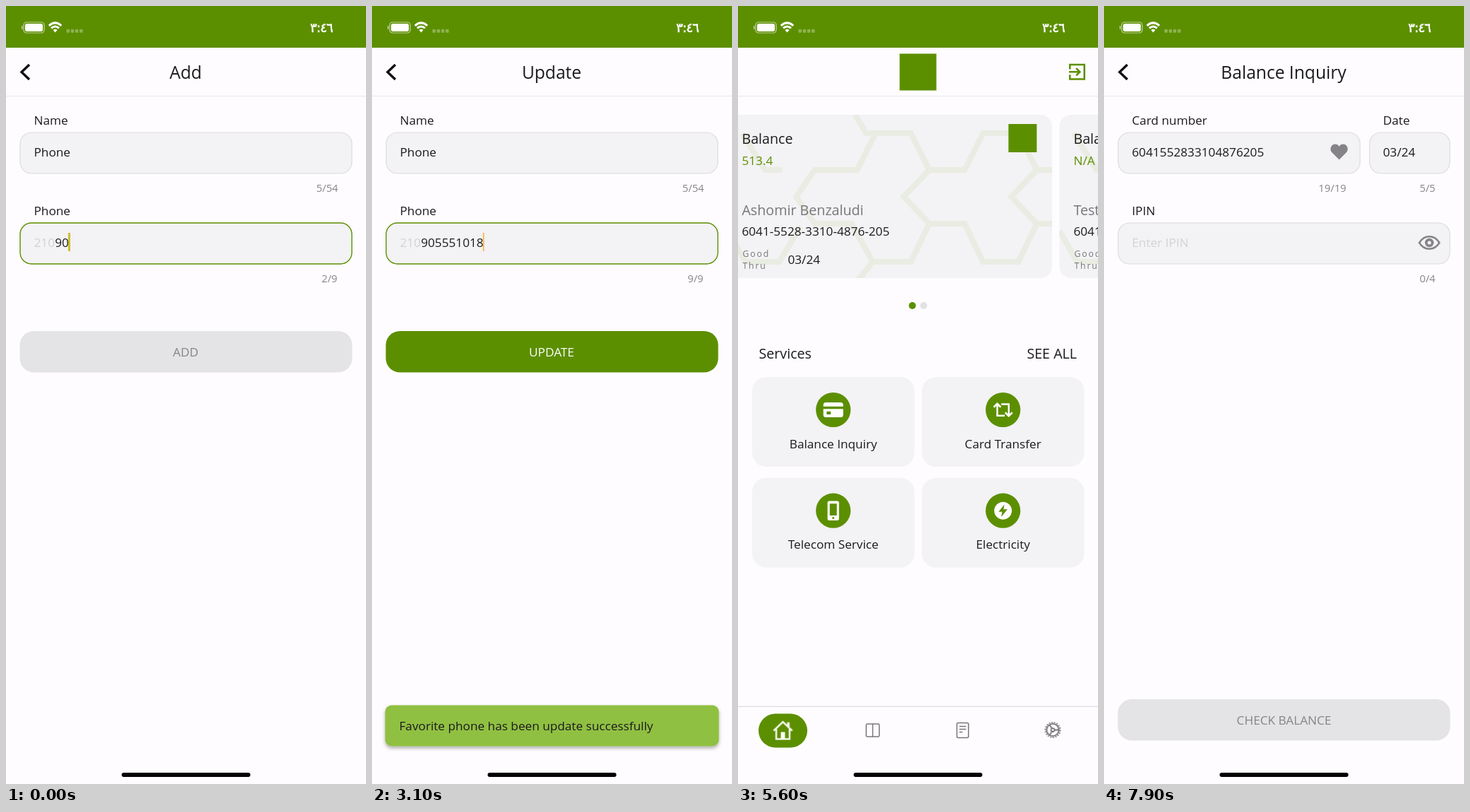
An HTML page for the animation above (8000 ms loop, 509x1101 px).

```html
<!DOCTYPE html>
<html lang="en">
<head>
<meta charset="utf-8">
<title>Favorite phone</title>
<style>
  html, body { margin: 0; width: 100%; height: 100%; overflow: hidden; background: #fefcfe; }
  svg { display: block; width: 509px; height: 1101px; }
  text { font: 17.2px "Open Sans", "Noto Sans", sans-serif; fill: #1b1a1d; }
  .t24 { font-size: 24.6px; }
  .t20 { font-size: 19.67px; }
  .t15 { font-size: 14.75px; fill: #858488; }
  .tiny { font-size: 12.3px; letter-spacing: 1.84px; fill: #77767a; }
  .mid { text-anchor: middle; }
  .end { text-anchor: end; }
  .grey { fill: #77767a; }
  .hint { fill: #d3d2d5; }
  .green { fill: #5c8f00; }
  .white { fill: #fff; }
  .clock { font: 18px "DejaVu Sans", sans-serif; letter-spacing: -.8px; fill: #fff; stroke: #fff; stroke-width: .6; }
  .ic { fill: currentColor; }
  .ln { fill: none; stroke: currentColor; stroke-width: 2; }
  .panel { fill: #f3f2f4; }
  .field { fill: #f3f2f4; stroke: #dddce0; stroke-width: 1.2; }
  .focus { stroke: #5c8f00; stroke-width: 1.4; }

  /* one loop is 8 s, so 1% is 80 ms */
  .anim { animation: 8s linear infinite; }
  #form { animation-name: form; }
  #tabs { animation-name: tabs; }
  #inquiry { animation-name: inquiry; }
  #toast { animation-name: toast; }
  #strip { animation-name: strip; }
  #pill { animation-name: pill; }
  #homeIcon { animation-name: homeIcon; }
  #gearIcon { animation-name: gearIcon; }
  #cards { animation-name: cards; }
  #dotA { animation-name: dotA; animation-timing-function: step-end; }
  #dotB { animation-name: dotB; animation-timing-function: step-end; }
  #send { animation-name: send; }
  #sendLabel { animation-name: sendLabel; }

  @keyframes form {
    0%, 40% { transform: translate(0); animation-timing-function: cubic-bezier(.2,.7,.35,1); }
    46.25% { transform: translate(502px); }
    47.5%, 100% { transform: translate(540px); }
  }
  @keyframes tabs {
    0%, 40% { transform: translate(-170px); animation-timing-function: cubic-bezier(.2,.7,.35,1); }
    46.25% { transform: translate(-2.3px); }
    47.5%, 92.75% { transform: translate(0); animation-timing-function: cubic-bezier(.2,.8,.3,1); }
    96.25%, 100% { transform: translate(-170px); }
  }
  @keyframes inquiry {
    0%, 92.75% { transform: translate(540px); animation-timing-function: cubic-bezier(.2,.8,.3,1); }
    96.25%, 100% { transform: translate(0); }
  }
  @keyframes toast {
    0%, 27.4% { transform: translate(0); opacity: 0; }
    31%, 40% { transform: translate(0); opacity: 1; animation-timing-function: cubic-bezier(.2,.7,.35,1); }
    46.25%, 50.5% { transform: translate(0, -67px); opacity: 1; }
    53.5%, 100% { transform: translate(0, -67px); opacity: 0; }
  }
  @keyframes strip {
    0%, 60.5% { transform: translate(-509px); animation-timing-function: cubic-bezier(.3,.3,.6,1); }
    62.5% { transform: translate(-85px); animation-timing-function: cubic-bezier(.1,.5,.3,1); }
    66.25%, 100% { transform: translate(0); }
  }
  @keyframes pill {
    0%, 60.5% { transform: translate(382px); animation-timing-function: cubic-bezier(.3,.3,.6,1); }
    62.5% { transform: translate(64px); animation-timing-function: cubic-bezier(.1,.5,.3,1); }
    66.25%, 100% { transform: translate(0); }
  }
  @keyframes homeIcon {
    0%, 60.5% { color: #77767a; transform: scale(1); }
    62.5% { color: #dddde0; transform: scale(1.15); }
    66.25%, 100% { color: #fff; transform: scale(1.18); }
  }
  @keyframes gearIcon {
    0%, 60.5% { color: #fff; transform: scale(1.18); }
    62.5%, 100% { color: #77767a; transform: scale(.96); }
  }
  @keyframes cards {
    0%, 69% { transform: translate(0); animation-timing-function: cubic-bezier(.4,.1,.25,1); }
    76.25%, 79.4% { transform: translate(-469px); animation-timing-function: cubic-bezier(.4,.1,.25,1); }
    88.5%, 100% { transform: translate(0); }
  }
  @keyframes dotA { 0% { fill: #5c8f00; } 72.4% { fill: #e2e1e4; } 83.6%, 100% { fill: #5c8f00; } }
  @keyframes dotB { 0% { fill: #e2e1e4; } 72.4% { fill: #5c8f00; } 83.6%, 100% { fill: #e2e1e4; } }
  @keyframes send {
    0%, 10.6% { fill: #e4e3e5; }
    13.6%, 16% { fill: #5c8f00; }
    18%, 27.4% { fill: #c5db9b; }
    28.75%, 100% { fill: #5c8f00; }
  }
  @keyframes sendLabel { 0%, 10.6% { fill: #858488; } 13.6%, 100% { fill: #fff; } }
</style>
</head>
<body>
<svg id="stage" viewBox="0 0 509 1101"></svg>
<script>
const GREEN = '#5c8f00';
const PHONE = '905551018';
const OWNER = 'Ashomir Benzaludi';
const CARD = '6041-5528-3310-4876-205';

const ICONS = {
  exit: '<path class="ln" d="M4 9V4H20V20H4V15M3 12H15M11 8l4 4-4 4"/>',
  card: '<path fill-rule="evenodd" d="M3 3H21Q24 3 24 6V8H0V6Q0 3 3 3ZM0 11H24V18Q24 21 21 21H3Q0 21 0 18ZM4 14V17.5H9V14Z"/>',
  people: '<circle cx="7.5" cy="8.5" r="3.2"/><circle cx="16" cy="8" r="3.6"/><path d="M0 19.5V18Q0 13.5 6 13.5Q9.5 13.5 10.5 15Q9 17 9 19.5ZM10.5 19.5Q10.5 13 16.5 13Q24 13 24 18V19.5Z"/>',
  call: '<path d="M5 3H8Q9 3 9.5 5L10.3 8L8 10.5Q10 14 13.5 16L16 13.6L20 15Q21 15.5 21 17V19Q21 21 19 21Q11 20.500 6.500 15.500Q3 11 3 5Q3 3 5 3Z"/>',
  bolt: '<path fill-rule="evenodd" d="M12 2a10 10 0 1 0 .01 0ZM13.500 5L7 13.200H11L10 19L17 10.500H12.600Z"/>',
  chat: '<path d="M10 4C4.500 4 1.500 7 1.500 10.500C1.500 13 3 14.500 3.500 15Q3 17 1.500 18.500Q5 18.500 7 17Q18.500 18 18.500 10.500C18.500 7 15.500 4 10 4ZM19.700 8Q22.500 9.500 22.500 13Q22.500 15.500 21 17Q21.500 19 22.500 20.300Q19.500 20.300 17.500 19Q13 19.700 10.500 18Q20.500 17.500 19.700 8Z"/>',
  swap: '<path class="ln" d="M1.500 9L5.500 5L9.500 9M5.500 5V18.500H14M22.500 15L18.500 19L14.500 15M18.500 19V5.500H10"/>',
  mobile: '<path fill-rule="evenodd" d="M7.500 1H16.500Q18.500 1 18.500 3V21Q18.500 23 16.500 23H7.500Q5.500 23 5.500 21V3Q5.500 1 7.500 1ZM8 4V17.500H16V4ZM12 19a1.200 1.200 0 1 0 .01 0Z"/>',
  home: '<path class="ln" stroke-width="1.6" d="M.8 12.500L12 2L23.200 12.500M4 10.500V22.500H20V10.500"/><path d="M9.500 14H14.500V23H9.500ZM17 2.500H20V8L17 5.500Z"/>',
  book: '<rect class="ln thin" x="2.800" y="3" width="18.400" height="18" rx="1.500"/><path class="ln thin" d="M12 3V21"/>',
  doc: '<rect class="ln thin" x="4" y="1.500" width="16.400" height="21" rx="2"/><path class="ln thin" d="M7.500 6.500H17M7.500 10.500H17M7.500 14.500H12"/>',
  gear: '<circle class="ln" cx="12" cy="12" r="9"/><circle class="ln" cx="12" cy="12" r="11" pathLength="36" stroke-dasharray="1 1"/><circle class="ln" cx="12" cy="12" r="2.500"/><path class="ln" d="M14.500 12H21M10.700 9.800L7.500 4.200M10.700 14.200L7.500 19.800"/>',
  heart: '<path d="M12 22L2.500 12.500C-1 8 2 2 7 2Q10 2 12 5Q14 2 17 2C22 2 25 8 21.500 12.500Z"/>',
  eye: '<path class="ln" stroke-width="1.6" d="M.6 12Q5 5 12 5T23.400 12Q19 19 12 19T.6 12Z"/><circle cx="12" cy="12" r="3.500" class="ln" style="stroke-width:3"/>'
};

const text = (x, y, s, cls = '', extra = '') => `<text x="${x}" y="${y}" class="${cls}" ${extra}>${s}</text>`;
const rect = (x, y, w, h, r, attrs) => `<rect x="${x}" y="${y}" width="${w}" height="${h}" rx="${r}" ${attrs}/>`;
const dot = (x, y, r, attrs) => `<circle cx="${x}" cy="${y}" r="${r}" ${attrs}/>`;
const line = (d, color, w) => `<path d="${d}" fill="none" stroke="${color}" stroke-width="${w}"/>`;
const icon = (name, x, y, s, color = 'inherit') =>
  `<g class="ic" color="${color}" transform="translate(${x} ${y}) scale(${s}) translate(-12 -12)">${ICONS[name]}</g>`;
const field = (x, y, w, cls = '') => rect(x, y, w, 58, 16, `class="field ${cls}"`);
const base = () => rect(0, 0, 509, 1101, 0, 'fill="#fefcfe"') + rect(0, 0, 509, 59, 0, `fill="${GREEN}"`) +
  line('M0 127.500H509', '#e8e7eb', 1);
const edge = rect(-14, 0, 14, 1101, 0, 'fill="url(#edge)"');
const back = line('M33 83L22 93.500L33 104', '#111', 3.4);

const formPage = () => edge + base() + back +
  text(254, 102.5, 'Add', 't24 mid', 'id="title"') +
  text(39.5, 167.5, 'Name') + field(20, 179, 469) + text(39.5, 213, 'Phone') + text(469.5, 263, '5/54', 't15 end') +
  text(39.5, 296, 'Phone') + field(20, 307, 469, 'focus') +
  text(39.5, 341, '210', 'hint') + text(69.2, 341, '', '', 'id="digits"') +
  rect(0, 321, 1.7, 26, 0, 'id="caret"') + text(468.5, 391, '', 't15 end', 'id="count"') +
  rect(19.5, 460, 470, 58.5, 20, 'id="send" class="anim"') +
  text(254, 495.7, 'ADD', 'mid anim', 'id="sendLabel"') +
  `<circle id="spinner" cx="254.500" cy="489.500" r="14.500" pathLength="360" fill="none" stroke="${GREEN}" stroke-width="4"/>`;

const inquiryPage = () => edge + base() + back +
  text(254, 102.5, 'Balance Inquiry', 't24 mid') +
  text(39.5, 167.5, 'Card number') + field(20, 179, 342) + text(39.5, 213, CARD.replaceAll('-', '')) +
  icon('heart', 332.5, 206.5, 1.1, '#858387') + text(342.5, 263, '19/19', 't15 end') +
  text(394.5, 167.5, 'Date') + field(375.5, 179, 113.5) + text(394.5, 213, '03/24') + text(468.5, 263, '5/5', 't15 end') +
  text(39.5, 296, 'IPIN') + field(20, 307, 469) + text(39.5, 341, 'Enter IPIN', 'hint') +
  icon('eye', 460, 335, 1.25, '#858387') + text(468.5, 391, '0/4', 't15 end') +
  rect(19.5, 981, 470, 58.5, 20, 'fill="#e4e3e5"') + text(254.5, 1017, 'CHECK BALANCE', 'mid', 'style="fill:#858488"');

const row = (y, label, name) => rect(19.5, y, 470, 68.5, 16, 'class="panel"') + text(108.3, y + 40.5, label) +
  (name ? icon(name, 53.5, y + 34.3, name === 'card' ? 1.17 : 1.26, GREEN) : '');
const settingsPage = () => base() + text(254, 102.5, 'Settings', 't24 mid') +
  row(149.8, OWNER) + dot(56.5, 184, 17.2, `fill="${GREEN}"`) + text(56.5, 190, 'A', 'white mid') +
  row(228.4, 'Logout', 'exit') + text(29.5, 355, 'General Settings', 't24') +
  [['Manage Own Cards', 'card'], ['Manage Friend Cards', 'people'], ['Manage Phone', 'call'],
   ['Manage Meter number', 'bolt'], ['Language', 'chat']].map(([label, name], i) => {
    const y = 384.4 + 78.6 * i;
    return row(y, label, name) + line(`M450 ${y + 25.5}l8.500 8.500-8.500 8.500`, GREEN, 2.8);
  }).join('');

const PATTERN = 'M45 180L78 232H102M25 318L50 362H98L128 312M205 154L221 180H284L310 232H360L386 180H436L462 232H490' +
  'M234 180L208 232H148L122 270L148 308H200L230 362H284L310 308H360L386 362H436L462 308H490' +
  'M310 232L274 270L310 308M462 232L426 270L462 308M230 362L208 390';
const bankCard = (x, balance, owner, number) => `<g transform="translate(${x})" clip-path="url(#cardClip)">` +
  rect(25, 154, 458.7, 231, 16, 'class="panel"') + line(PATTERN, '#e9ece2', 8) +
  rect(422, 167, 40, 40, 0, `fill="${GREEN}"`) +
  text(45, 195, 'Balance', 't20') + text(45, 225, balance, 'green') + text(45, 295.5, owner, 't20 grey') +
  text(45, 325, number) + text(46, 354.5, 'Good', 'tiny') + text(46, 371.5, 'Thru', 'tiny') + text(110, 365, '03/24') + '</g>';
const tile = (x, y, label, name) => rect(x, y, 229.5, 127, 20, 'class="panel"') +
  dot(x + 114.7, y + 46.5, 24.6, `fill="${GREEN}"`) + icon(name, x + 114.7, y + 46.5, name === 'card' ? 1.17 : 1.25, '#fff') +
  text(x + 114.7, y + 100.5, label, 'mid');
const homePage = () => base() + rect(228.5, 67.5, 52, 52, 0, `fill="${GREEN}"`) + icon('exit', 479.5, 93.3, 1.28, GREEN) +
  '<g id="cards" class="anim">' + bankCard(0, '513.4', OWNER, CARD) + bankCard(469, 'N/A', 'Test', '6041-5528-3316-9042-731') + '</g>' +
  dot(246.5, 424, 5, 'id="dotA" class="anim"') + dot(262.5, 424, 5, 'id="dotB" class="anim"') +
  text(29.5, 499, 'Services', 't20') + text(479, 499, 'SEE ALL', 't20 end') +
  tile(20, 525, 'Balance Inquiry', 'card') + tile(260, 525, 'Card Transfer', 'swap') +
  tile(20, 667.7, 'Telecom Service', 'mobile') + tile(260, 667.7, 'Electricity', 'bolt');

const navBar = () => rect(0, 991, 509, 110, 0, 'fill="#fefcfe"') + line('M0 991.300H509', '#dddce0', 1.2) +
  rect(29, 1001.5, 69, 48, 24, `id="pill" class="anim" fill="${GREEN}"`) +
  `<g transform="translate(63.500 1025)"><g id="homeIcon" class="anim">${icon('home', 0, 0, 1)}</g></g>` +
  icon('book', 190.5, 1025, 1, '#77767a') + icon('doc', 317.5, 1025, 1, '#77767a') +
  `<g transform="translate(445 1024.500)"><g id="gearIcon" class="anim">${icon('gear', 0, 0, 1)}</g></g>`;

const statusBar = () => rect(25, 23, 29, 15, 4, 'fill="none" stroke="#c3d6a0" stroke-width="1.2"') +
  rect(27, 25, 25, 11, 2.5, 'fill="#fff"') + rect(22, 28, 1.5, 5, .7, 'fill="#c3d6a0"') +
  line('M60.800 27.800Q69.500 20 78.200 27.800', '#fff', 3) + line('M64 31.400Q69.500 26.600 75 31.400', '#fff', 3) +
  '<path d="M66.500 34Q69.500 31.500 72.500 34L69.500 37.500Z" fill="#fff"/>' +
  [0, 1, 2, 3].map(i => rect(85.5 + 6.2 * i, 33, 4.4, 4.8, .8, 'fill="#8fb350"')).join('') +
  text(446, 36.5, '٣:٤٦', 'clock mid') + rect(163.5, 1085, 182, 6, 3, 'fill="#000"');

const layer = (id, body) => `<g id="${id}" class="anim">${body}</g>`;
const $ = id => document.getElementById(id);

$('stage').innerHTML = `<defs>
  <linearGradient id="edge"><stop offset="0" stop-opacity="0"/><stop offset="1" stop-opacity=".13"/></linearGradient>
  <clipPath id="cardClip">${rect(25, 154, 458.7, 231, 16, '')}</clipPath>
  <filter id="lift" x="-5%" y="-20%" width="110%" height="150%"><feDropShadow dx="0" dy="3" stdDeviation="2.500" flood-opacity=".3"/></filter>
  <style>.thin { stroke-width: 1.5 }</style></defs>` +
  layer('tabs', layer('strip', homePage() + `<g transform="translate(509)">${settingsPage()}</g>`) + navBar()) +
  layer('form', formPage()) + layer('inquiry', inquiryPage()) +
  layer('toast', rect(18.5, 989.5, 472, 58, 9, 'fill="#90c043" filter="url(#lift)"') +
    text(38.5, 1025, 'Favorite phone has been update successfully')) +
  statusBar();

const KEYS = [200, 200, 300, 500, 600, 700, 900];
const clock = $('form').getAnimations()[0];

function draw() {
  const t = (clock.currentTime || 0) % 8000;
  const n = 2 + KEYS.filter(k => t >= k).length;
  $('digits').textContent = PHONE.slice(0, n);
  $('count').textContent = n + '/9';

  const wide = t < 200;
  const caret = $('caret');
  caret.setAttribute('x', 69.2 + $('digits').getComputedTextLength() - (wide ? 1 : .8));
  caret.setAttribute('width', wide ? 3 : 1.7);
  caret.setAttribute('fill', wide ? '#cbbd2c' : '#f5b83d');
  caret.setAttribute('opacity', t < 1300 ? 1 : Math.min(1, Math.max(0, .5 + 1.2 * Math.cos((t - 1600) * Math.PI / 250))));

  const busy = t >= 1300 && t < 2200;
  $('title').textContent = t < 2200 ? 'Add' : 'Update';
  $('sendLabel').textContent = busy ? '' : t < 1300 ? 'ADD' : 'UPDATE';

  const dt = t - 1600;
  const sweep = 116 + 100 * Math.sin(dt / 130);
  const spinner = $('spinner');
  spinner.setAttribute('visibility', busy ? 'visible' : 'hidden');
  spinner.setAttribute('stroke-dasharray', `${sweep} ${360 - sweep}`);
  spinner.setAttribute('transform', `rotate(${dt * .75 - 58} 254.500 489.500)`);
  requestAnimationFrame(draw);
}
draw();
</script>
</body>
</html>
```
